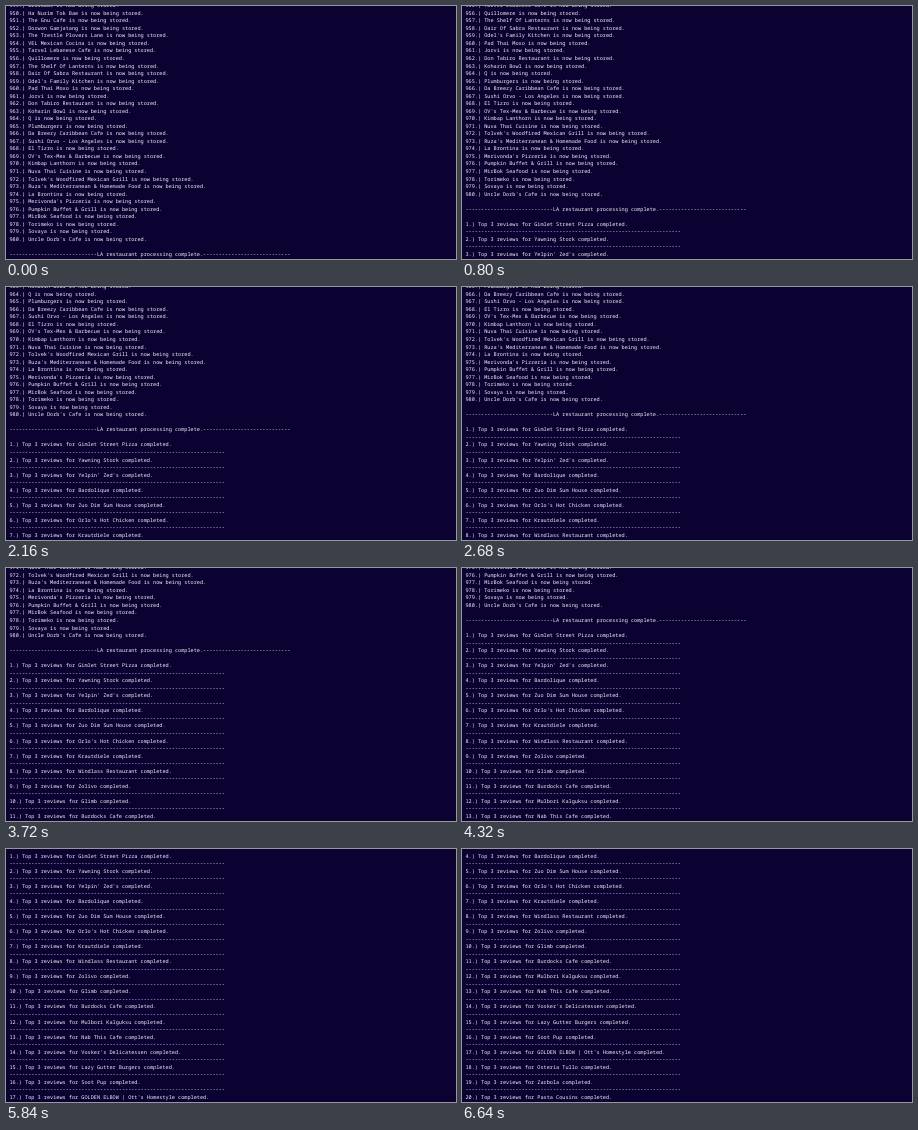
An HTML page for the animation above (6.68 s loop, 450x253 px).

```html
<!DOCTYPE html>
<html lang="en">
<head>
<meta charset="utf-8">
<title>Terminal log</title>
<style>
  html, body { margin: 0; width: 100%; height: 100%; overflow: hidden; background: #0b0232; }
  svg { display: block; width: 100vw; height: 100vh; }
  text {
    font: 500 5.21px "Noto Sans Mono", "DejaVu Sans Mono", monospace;
    fill: #f4f4fa;
    text-rendering: geometricPrecision;
    white-space: pre;
  }
</style>
</head>
<body>
<svg viewBox="0 0 450 253" preserveAspectRatio="none">
  <rect width="450" height="253" fill="#0b0232"/>
  <g id="log"></g>
</svg>
<script>
const LOOP = 6680;
const LEFT = 3.5;
const BOTTOM = 249.8;   // baseline of the lowest visible row
const PITCH = 7.53;

const FIRST_STORED = 949;
const stored = [
  "Brisodas", "Ha Nurim Tok Bae", "The Gnu Cafe", "Dorwon Gamjatang",
  "The Trestle Plovers Lane", "VEL Mexican Cocina", "Tarvel Lebanese Cafe",
  "Quillomere", "The Shelf Of Lanterns", "Dair Of Sabra Restaurant",
  "Odel's Family Kitchen", "Pad Thai Moxo", "Jorvi", "Don Tabiro Restaurant",
  "Koharin Bowl", "Q", "Plumburgers", "Da Breezy Caribbean Cafe",
  "Sushi Orvo - Los Angeles", "El Tizro", "OV's Tex-Mex & Barbecue",
  "Kimbap Lanthorn", "Nuva Thai Cuisine", "Tolvek's Woodfired Mexican Grill",
  "Ruza's Mediterranean & Homemade Food", "La Brontina", "Merivonda's Pizzeria",
  "Pumpkin Buffet & Grill", "MirBok Seafood", "Torimeko", "Sovaya",
  "Uncle Dorb's Cafe"
];

// Each review appears at its time in ms and pushes the log up by two rows.
const reviews = [
  [160, "Gimlet Street Pizza"], [440, "Yawning Stork"], [720, "Yelpin' Zed's"],
  [1000, "Bardolique"], [1360, "Zuo Dim Sum House"], [1720, "Orlo's Hot Chicken"],
  [2080, "Krautdiele"], [2680, "Windlass Restaurant"], [3040, "Zolivo"],
  [3360, "Glimb"], [3680, "Burdocks Cafe"], [4000, "Mulbori Kalguksu"],
  [4240, "Nab This Cafe"], [4440, "Vosker's Delicatessen"],
  [4800, "Lazy Gutter Burgers"], [5080, "Soot Pup"],
  [5600, "GOLDEN ELBOW | Ott's Homestyle"], [5920, "Osteria Tullo"],
  [6240, "Zarbola"], [6520, "Pasta Cousins"]
];

const dashes = count => "-".repeat(count);

const lines = [
  ...stored.map((name, i) => `${FIRST_STORED + i}.) ${name} is now being stored.`),
  "",
  dashes(28) + "LA restaurant processing complete." + dashes(28)
];
const startRow = lines.length - 1;
reviews.forEach(([, name], i) => lines.push(
  i ? dashes(69) : "",
  `${i + 1}.) Top 3 reviews for ${name} completed.`
));

const log = document.getElementById("log");
const rows = lines.map((line, i) => {
  const row = document.createElementNS("http://www.w3.org/2000/svg", "text");
  row.setAttribute("x", LEFT);
  row.textContent = line;
  log.append(row);
  return row;
});

let shown = -1;
function render(time) {
  const done = reviews.filter(([at]) => at <= time).length;
  if (done === shown) return;
  shown = done;
  const last = startRow + 2 * done;
  rows.forEach((row, i) => {
    row.setAttribute("y", (BOTTOM + (i - last) * PITCH).toFixed(2));
    row.setAttribute("visibility", i <= last ? "visible" : "hidden");
  });
}

const start = performance.now();
function tick() {
  render((performance.now() - start) % LOOP);
  requestAnimationFrame(tick);
}
render(0);
requestAnimationFrame(tick);
</script>
</body>
</html>
```
